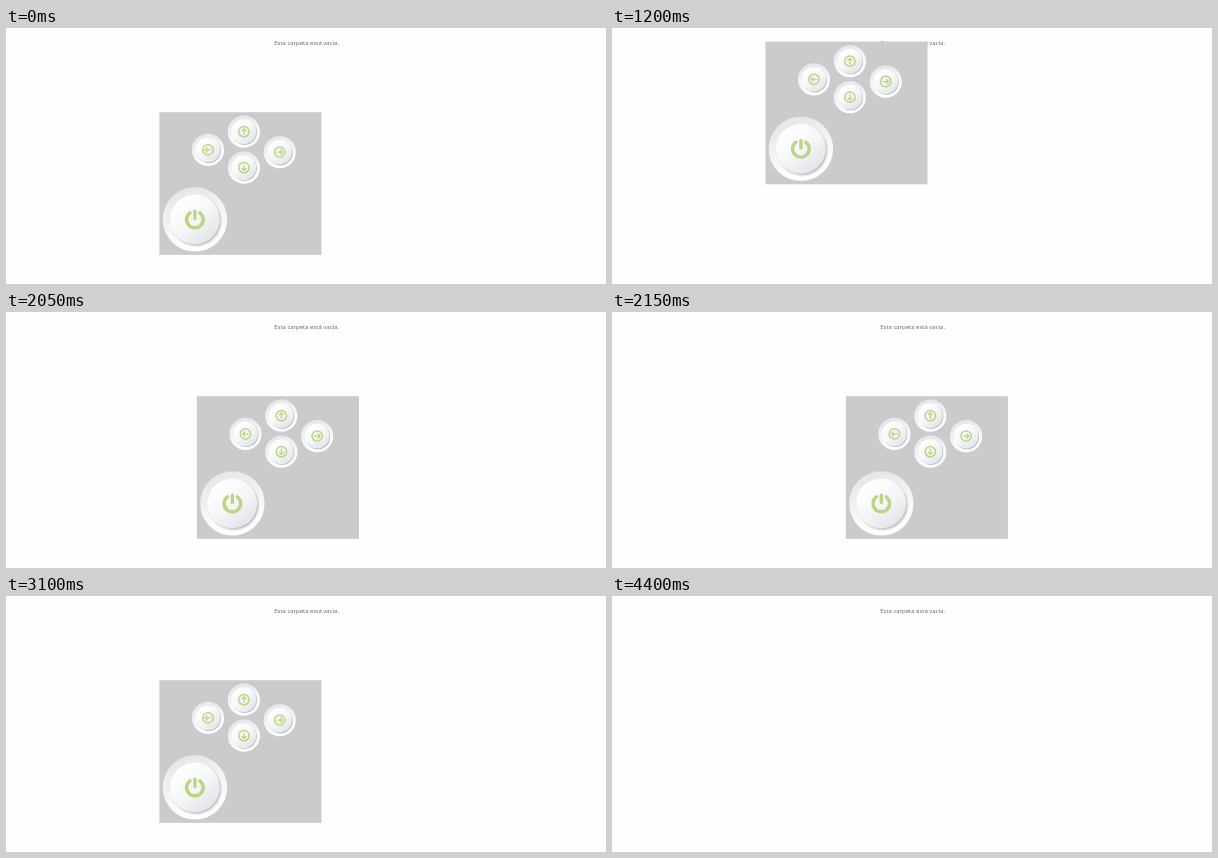
An HTML page for the animation above (5.1 s loop, 600 by 256 pixels).

```html
<!DOCTYPE html>
<html lang="es">
<head>
<meta charset="utf-8">
<title>Panel</title>
<style>
  html, body { margin: 0; width: 100%; height: 100%; overflow: hidden; background: #fefefe; }
  svg { display: block; width: 600px; height: 256px; }
  text { font: 6px "Open Sans", "Noto Sans", sans-serif; fill: #606060; }
  .icon { fill: none; stroke: #bcd585; stroke-linecap: round; stroke-linejoin: round; }
</style>
</head>
<body>
<svg viewBox="0 0 600 256">
  <defs>
    <linearGradient id="rim" x1=".25" y1="0" x2=".6" y2="1">
      <stop offset="0" stop-color="#e4e5e7"/>
      <stop offset=".45" stop-color="#f1f2f3"/>
      <stop offset=".85" stop-color="#fff"/>
    </linearGradient>
    <linearGradient id="cap" x1=".2" y1=".1" x2=".85" y2=".9">
      <stop offset="0" stop-color="#fff"/>
      <stop offset=".5" stop-color="#f5f6f8"/>
      <stop offset="1" stop-color="#e2e4e8"/>
    </linearGradient>
    <filter id="soft" x="-20%" y="-20%" width="140%" height="140%">
      <feGaussianBlur stdDeviation="1.1"/>
    </filter>
    <g id="button">
      <circle r="32.2" fill="url(#rim)"/>
      <circle cx="1.5" cy="1.7" r="24.6" fill="#b9bbbf" filter="url(#soft)"/>
      <circle r="24.8" fill="url(#cap)"/>
    </g>
    <g id="arrow" class="icon" stroke-width="1.5">
      <circle r="5.2"/>
      <path d="M-2.8 0H2.8M.8-2.1 2.9 0 .8 2.1" stroke-width="1.3"/>
    </g>
  </defs>
  <text x="268.2" y="17.2">Esta carpeta está vacía.</text>
  <g id="panel">
    <rect x="153.4" y="84.2" width="162.1" height="142.7" fill="#cccacd"/>
    <g id="arrows"></g>
    <g transform="translate(188.9 191.4)">
      <use href="#button"/>
      <path class="icon" stroke-width="3.4" d="M-4.9-6.6A8.3 8.3 0 1 0 4.9-6.6M0-8.3V-.8"/>
    </g>
  </g>
</svg>
<script>
const LOOP = 5100, STEP = 50, UP = -71, RIGHT = 80.4;
const panel = document.getElementById("panel");

// x, y and direction of each arrow button
const arrows = [[237.9, 103.7, -90], [202, 121.9, 180], [273.7, 124.1, 0], [237.9, 139.7, 90]];
document.getElementById("arrows").innerHTML = arrows.map(([x, y, turn]) =>
  `<g transform="translate(${x} ${y})"><use href="#button" transform="scale(.5)"/>` +
  `<use href="#arrow" transform="rotate(${turn})"/></g>`).join("");

const clamp = v => Math.min(1, Math.max(0, v));
const swing = v => 0.5 - Math.cos(Math.PI * clamp(v)) / 2;

// share of a move covered at time t, one entry per step
function covered(t, start, steps) {
  const i = Math.floor((t - start) / STEP);
  return i < 0 ? 0 : steps[Math.min(i, steps.length - 1)];
}

const back = [0.006, 0.19, 0.52, 0.84, 1];

function draw(now) {
  const t = Math.floor(now % LOOP / STEP) * STEP;
  const y = UP * (covered(t, 400, [0.04, 0.352, 0.75, 1]) - covered(t, 1200, back));
  const x = RIGHT * (covered(t, 1950, [0.06, 0.06, 0.466, 0.83, 1]) - covered(t, 2900, back));
  panel.setAttribute("transform", `translate(${x} ${y})`);
  panel.setAttribute("opacity", 1 - swing((t - 4010) / 390));
}

const begin = performance.now();
function tick() {
  draw(performance.now() - begin);
  requestAnimationFrame(tick);
}
tick();
</script>
</body>
</html>
```
